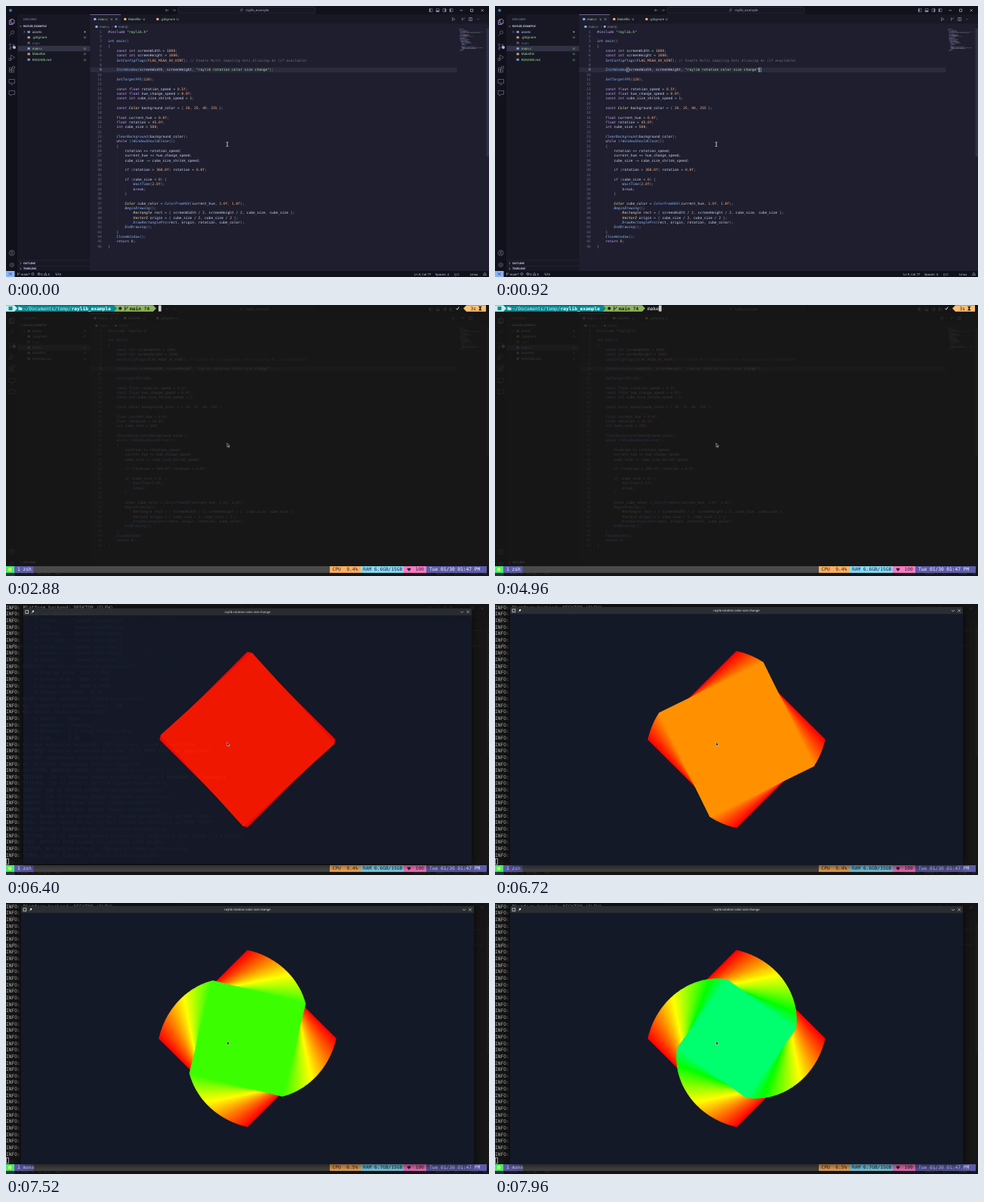
Recreate the animation shown at these times as an HTML page. Size 640 by 360 pixels, loop 8000 ms.

```html
<!DOCTYPE html>
<html lang="en">
<head>
<meta charset="utf-8">
<title>raylib_example</title>
<style>
  html, body { margin: 0; width: 640px; height: 360px; overflow: hidden; background: #1e1e2e; }
  svg { display: block; }
  text { white-space: pre; text-rendering: geometricPrecision; font-family: "Noto Sans", "Open Sans", sans-serif; }
  .mono { font-family: "DejaVu Sans Mono", "Liberation Mono", monospace; }
  .shadow { filter: drop-shadow(0 2px 7px rgba(0, 0, 0, .75)); }
</style>
</head>
<body>
<svg id="stage" width="640" height="360" viewBox="0 0 640 360"></svg>
<script>
const LOOP = 8000, STEP = 40;
const stage = document.getElementById('stage');

function el(parent, tag, attrs = {}, content) {
  const node = document.createElementNS('http://www.w3.org/2000/svg', tag);
  for (const k in attrs) node.setAttribute(k, attrs[k]);
  if (content !== undefined) node.textContent = content;
  return parent.appendChild(node);
}
const group = (parent, attrs) => el(parent, 'g', attrs);
const box = (parent, x, y, width, height, fill, more) => el(parent, 'rect', { x, y, width, height, fill, ...more });
const dot = (parent, cx, cy, r, fill) => el(parent, 'circle', { cx, cy, r, fill });
const line = (parent, d, stroke, w = 0.6, more) =>
  el(parent, 'path', { d, stroke, fill: 'none', 'stroke-width': w, ...more });
const shape = (parent, d, fill, more) => el(parent, 'path', { d, fill, ...more });
// y is the middle of the text line
const label = (parent, x, y, str, fill, size = 4.3, more) =>
  el(parent, 'text', { x, y: y + size * 0.35, fill, 'font-size': size, ...more }, str);
const show = (node, on) => node.setAttribute('display', on ? 'inline' : 'none');

/* ---------- editor ---------- */
const C = { crust: '#11111b', mantle: '#181825', base: '#1e1e2e', text: '#cdd6f4', dim: '#6c7086',
  green: '#a6e3a1', mauve: '#cba6f7', blue: '#89b4fa', yellow: '#f9e2af', peach: '#fab387',
  teal: '#94e2d5', punct: '#9399b2', line: '#313244' };

const CODE = `#include "raylib.h"

int main()
{
    const int screenWidth = 1800;
    const int screenHeight = 1000;
    SetConfigFlags(FLAG_MSAA_4X_HINT); // Enable Multi Sampling Anti Aliasing 4x (if available)

    InitWindow(screenWidth, screenHeight, "raylib rotation color size change");

    SetTargetFPS(120);

    const float rotation_speed = 0.5f;
    const float hue_change_speed = 0.9f;
    const int cube_size_shrink_speed = 1;

    const Color background_color = { 20, 25, 40, 255 };

    float current_hue = 0.0f;
    float rotation = 45.0f;
    int cube_size = 500;

    ClearBackground(background_color);
    while (!WindowShouldClose())
    {
        rotation += rotation_speed;
        current_hue += hue_change_speed;
        cube_size -= cube_size_shrink_speed;

        if (rotation > 360.0f) rotation = 0.0f;

        if (cube_size < 0) {
            WaitTime(2.0f);
            break;
        }

        Color cube_color = ColorFromHSV(current_hue, 1.0f, 1.0f);
        BeginDrawing();
            Rectangle rect = { screenWidth / 2, screenHeight / 2, cube_size, cube_size };
            Vector2 origin = { cube_size / 2, cube_size / 2 };
            DrawRectanglePro(rect, origin, rotation, cube_color);
        EndDrawing();
    }
    CloseWindow();
    return 0;
}`.split('\n');

const TOKEN = /(\/\/.*)|("[^"]*")|(#include|\b(?:const|int|float|while|if|break|return)\b)|(\b(?:Color|Rectangle|Vector2)\b)|([A-Za-z]\w*(?=\())|(\bFLAG\w+|\b\d[\d.]*f?\b)|([-+*\/=<>!]+)|([{}(),;]+)|\w+|\s+|./g;
const TOKEN_FILL = [C.dim, C.green, C.mauve, C.yellow, C.blue, C.peach, C.teal, C.punct];
const ITALIC = [0, 3, 4];
const CODE_X = 135.3, CHAR = 2.787, CODE_SIZE = CHAR / 0.602, ROW = 6.333;
const rowY = n => 34.2 + (n - 1) * ROW;

const ide = group(stage);
box(ide, 0, 0, 640, 360, C.base);

function drawChrome() {
  box(ide, 0, 0, 640, 11.5, C.crust);
  box(ide, 0, 11.5, 15.5, 341, C.crust);
  box(ide, 15.5, 11.5, 96, 341, C.mantle);
  box(ide, 111.5, 11.5, 528.5, 12, C.mantle);
  box(ide, 0, 352, 640, 8, C.crust);

  // title bar
  dot(ide, 6, 5.7, 2, '#2a7fc0');
  box(ide, 228, 1.5, 182, 8.5, C.mantle, { rx: 1.5, stroke: C.line, 'stroke-width': 0.5 });
  label(ide, 333, 5.7, 'raylib_example', '#a6adc8', 4.4, { 'text-anchor': 'middle' });
  line(ide, 'M311.2 5a1.2 1.2 0 1 0 2.4 0a1.2 1.2 0 1 0-2.4 0M311.6 6l-1.2 1.5', C.punct, 0.5);
  line(ide, 'M215.5 5.7h-4m1.6-1.6l-1.6 1.6l1.6 1.6', C.punct);
  line(ide, 'M220.5 5.7h4m-1.6-1.6l1.6 1.6l-1.6 1.6', C.dim);
  [563, 572, 581, 590].forEach((x, i) => {
    line(ide, `M${x - 2} 3.7h4v4h-4z`, C.punct, 0.5);
    box(ide, i == 2 ? x + 0.5 : x - 2, i == 1 ? 5.9 : 3.7, i == 1 ? 4 : 1.5, i == 1 ? 1.8 : 4, C.punct);
  });
  line(ide, 'M601.5 5.8h3.5M615.5 4.2h3.2v3.2h-3.2zM629.6 4.2l3.2 3.2m0-3.2l-3.2 3.2', C.text, 0.6);

  // activity bar
  line(ide, 'M6.5 17.5h3l1.5 1.5v4h-4.5zM6.5 19h-2v5.5h4.5V23', C.mauve, 0.7);
  [ 'M6.6 35a2 2 0 1 0 4 0a2 2 0 1 0-4 0M7.2 36.5l-2.7 3',
    'M5.5 50a1 1 0 1 0 .1 0M5.5 56a1 1 0 1 0 .1 0M10 51a1 1 0 1 0 .1 0M5.5 52v4M10 53q0 2-4 2.3',
    'M6.5 65l5 3.2l-5 3.2zM4 69.5h2.5v3h-2.5z',
    'M4.5 82h3v3h-3zM4.5 85h3v3h-3zM7.5 85h3v3h-3zM8.7 80.3h2.8v2.8h-2.8z',
    'M4 97.5h7.5v5h-7.5zM6 104.5h3.5',
    'M4 112.5h7.5v5h-3.5l-2 2v-2h-2z',
    'M4.2 328a3.5 3.5 0 1 0 7 0a3.5 3.5 0 1 0-7 0M6.5 327a1.2 1.2 0 1 0 2.4 0a1.2 1.2 0 1 0-2.4 0M5.5 330.3q2.2-2.4 4.4 0',
    'M5 344a2.7 2.7 0 1 0 5.4 0a2.7 2.7 0 1 0-5.4 0M7 344a.8.8 0 1 0 1.6 0a.8.8 0 1 0-1.6 0'
  ].forEach(d => line(ide, d, C.dim, 0.7));
  dot(ide, 11, 55, 2, C.mauve);

  // explorer
  label(ide, 23, 17.5, 'EXPLORER', C.punct, 3.6);
  label(ide, 23, 27, 'RAYLIB_EXAMPLE', C.text, 3.6, { 'font-weight': 700 });
  line(ide, 'M18.2 26.3l1.3 1.4l1.3-1.4', C.text, 0.5);
  box(ide, 15.5, 52.8, 96, 7.4, C.line);
  [['assets', C.text, C.blue], ['.gitignore', C.green, C.peach], ['main', C.dim, C.dim],
   ['main.c', C.green, C.blue], ['Makefile', C.green, C.peach], ['README.md', C.green, C.blue]
  ].forEach(([name, fill, mark], i) => {
    const y = 34.4 + i * 7.36;
    box(ide, 28.5, y - 1.5, 3.4, 3, mark, { rx: 0.5, opacity: 0.8 });
    label(ide, 34.8, y, name, fill, 4.3);
    if (i == 0) {
      line(ide, `M23.6 ${y - 1.3}l1.4 1.3l-1.4 1.3`, C.text, 0.5);
      dot(ide, 104.5, y, 0.9, C.green);
    } else if (i != 2) label(ide, 103, y, 'U', C.green, 4);
  });
  [['OUTLINE', 341.7], ['TIMELINE', 349]].forEach(([name, y]) => {
    line(ide, `M15.5 ${y - 3.7}h96`, C.line, 0.4);
    line(ide, `M18.7 ${y - 1.3}l1.4 1.3l-1.4 1.3`, C.text, 0.5);
    label(ide, 23, y, name, C.text, 3.6, { 'font-weight': 700 });
  });

  // tabs and breadcrumb
  box(ide, 111.5, 11.5, 40.5, 12, C.base);
  box(ide, 111.5, 11.5, 40.5, 0.5, C.mauve);
  [['main.c', 122, 138.5, C.blue], ['Makefile', 162, 181.5, C.peach], ['.gitignore', 205, 226, C.peach]
  ].forEach(([name, x, u, mark], i) => {
    box(ide, x - 5.6, 16, 3, 3, mark, { rx: 0.6 });
    label(ide, x, 17.5, name, C.green, 4.2);
    label(ide, u, 17.5, 'U', C.green, 3.8);
    if (i == 0) line(ide, 'M145 16.2l2.6 2.6m0-2.6l-2.6 2.6', C.text, 0.5);
  });
  box(ide, 118.5, 26, 3, 3, C.blue, { rx: 0.6 });
  label(ide, 124, 27.3, 'main.c', C.punct, 4.2);
  line(ide, 'M140.4 26.2l1.2 1.2l-1.2 1.2', C.dim, 0.5);
  box(ide, 144, 26, 2.8, 2.8, C.blue, { rx: 0.8 });
  label(ide, 149, 27.3, 'main()', C.punct, 4.2);
  line(ide, 'M591.5 15.5l3.4 2l-3.4 2zM604.5 15.5v4m0-2q3 0 3-2M613.5 15.5h4v4h-4zM615.5 15.5v4', C.punct, 0.6);
  label(ide, 624, 17, '···', C.text, 4.3);

  // status bar
  box(ide, 0, 352, 11.5, 8, C.blue);
  line(ide, 'M3.8 354.3l1.7 1.7l-1.7 1.7M7.7 354.3l-1.7 1.7l1.7 1.7', C.crust, 0.6);
  line(ide, 'M15.5 354.3v3.6M17.8 354.3q0 2-2.3 2.2', C.text, 0.5);
  label(ide, 19.5, 356.2, 'main*', C.text, 4.2);
  line(ide, 'M34 356a1.5 1.5 0 1 0 3 0a1.5 1.5 0 1 0-3 0', C.text, 0.5);
  line(ide, 'M42 356a1.5 1.5 0 1 0 3 0a1.5 1.5 0 1 0-3 0M42.7 355.2l1.6 1.6M50.5 357.6l1.8-3.2l1.8 3.2z', C.text, 0.5);
  label(ide, 46.3, 356.2, '0', C.text, 4.2);
  label(ide, 55.5, 356.2, '5', C.text, 4.2);
  line(ide, 'M66.5 354.5q-1.4 1.5 0 3m2.4-3q1.4 1.5 0 3m-1.2-1.5v2', C.text, 0.5);
  label(ide, 70.5, 356.2, '0', C.text, 4.2);
  [['Ln 9, Col 77', 541], ['Spaces: 4', 569], ['{} C', 594], ['Linux', 615]
  ].forEach(([s, x]) => label(ide, x, 356.2, s, C.text, 4.1));
  line(ide, 'M632.5 357.5h4l-.7-1.2v-1q-1.3-1.8-2.6 0v1z', C.text, 0.5);
}

function drawCode() {
  box(ide, 111.5, rowY(9) - ROW / 2, 486, ROW, '#2a2b3c');
  box(ide, 636.5, 30, 3.5, 170, '#45475a', { opacity: 0.45 });
  line(ide, `M147 ${rowY(26) - 3}V${rowY(43) - 3}M158 ${rowY(33) - 3}v${2 * ROW}`, C.line, 0.3);
  CODE.forEach((src, i) => {
    const y = rowY(i + 1);
    label(ide, 126.8, y, i + 1, i == 8 ? C.mauve : C.dim, CODE_SIZE, { class: 'mono', 'text-anchor': 'end' });
    const row = label(ide, CODE_X, y, '', C.text, CODE_SIZE, { class: 'mono' });
    for (const m of src.matchAll(TOKEN)) {
      const kind = m.slice(1).findIndex(Boolean);
      const fill = TOKEN_FILL[kind] || C.text;
      el(row, 'tspan', { fill, 'font-style': ITALIC.includes(kind) ? 'italic' : 'normal' }, m[0]);
      if (m[0].trim()) box(ide, 600 + m.index * 0.36, 30 + i * 0.66, m[0].length * 0.36, 0.45, fill, { opacity: 0.5 });
    }
  });
}
drawChrome();
drawCode();

const brackets = group(ide);
[14, 77].forEach(col => box(brackets, CODE_X + col * CHAR, rowY(9) - 2.9, CHAR, 5.8, '#89b4fa22',
  { stroke: C.punct, 'stroke-width': 0.5 }));
box(brackets, CODE_X + 77 * CHAR - 0.3, rowY(9) - 2.9, 0.6, 5.8, '#f5e0dc');

const beam = line(stage, 'M291.8 181h1l.4.4l.4-.4h1M293.2 181.4v4.6M291.8 186.4h1l.4-.4l.4.4h1', '#fff', 0.7);

/* ---------- terminal ---------- */
const CELL = 3.743, CELL_H = 8.66, TERM_SIZE = CELL / 0.602;
const D = { bar: '#4b4b4b', dark: '#282a36', purple: '#5d5cae', green: '#3df07a', yellow: '#e6f03c',
  orange: '#ffb05c', cyan: '#84dcf8', pink: '#ff79c6', white: '#f8f8f2', ink: '#17211a',
  os: '#c4f1ee', path: '#078a92', git: '#8fb45c', time: '#ffc070' };
const cells = (parent, x, row, str, fill, more) =>
  label(parent, x, 4.5 + row * CELL_H, str, fill, TERM_SIZE, { class: 'mono', ...more });

const LOG = `Platform backend: DESKTOP (GLFW)
Supported raylib modules:
    > rcore:..... loaded (mandatory)
    > rlgl:...... loaded (mandatory)
    > rshapes:... loaded (optional)
    > rtextures:. loaded (optional)
    > rtext:..... loaded (optional)
    > rmodels:... loaded (optional)
    > raudio:.... loaded (optional)
DISPLAY: Device initialized successfully
    > Display size: 1920 x 1080
    > Screen size:  1800 x 1000
    > Render size:  1800 x 1000
    > Viewport offsets: 0, 0
GLAD: OpenGL extensions loaded successfully
GL: Supported extensions count: 228
GL: OpenGL device information:
    > Vendor:   Mesa
    > Renderer: llvmpipe
    > Version:  3.3 (Core Profile) Mesa
    > GLSL:     3.30
GL: VAO extension detected, VAO functions loaded successfully
GL: NPOT textures extension detected, full NPOT textures supported
GL: DXT compressed textures supported
GL: ETC2/EAC compressed textures supported
PLATFORM: DESKTOP (GLFW): Initialized successfully
TEXTURE: [ID 1] Texture loaded successfully (1x1 | R8G8B8A8 | 1 mipmaps)
TEXTURE: [ID 1] Default texture loaded successfully
SHADER: [ID 1] Vertex shader compiled successfully
SHADER: [ID 2] Fragment shader compiled successfully
SHADER: [ID 3] Program shader loaded successfully
SHADER: [ID 3] Default shader loaded successfully
RLGL: Render batch vertex buffers loaded successfully in RAM (CPU)
RLGL: Render batch vertex buffers loaded successfully in VRAM (GPU)
RLGL: Default OpenGL state initialized successfully
TEXTURE: [ID 2] Texture loaded successfully (128x128 | GRAY_ALPHA | 1 mipmaps)
FONT: Default font loaded successfully (224 glyphs)
SYSTEM: Working Directory: ~/Documents/temp/raylib_example
TIMER: Target time per frame: 8.333 milliseconds`.split('\n');

const term = group(stage);
box(term, 0, 0, 640, 360, 'rgba(22,23,20,.82)');

const prompt = group(term);
shape(prompt, 'M143 .2h52l4 4.3l-4 4.3h-52z', D.git);
shape(prompt, 'M11 .2h132l4 4.3l-4 4.3h-132z', D.path);
shape(prompt, 'M0 .2h11l4 4.3l-4 4.3h-11z', D.os);
box(prompt, 3.5, 2, 5, 5, D.path);
shape(prompt, 'M16.5 2.6h2l.6.8h2.4v3.4h-5z', '#e4e4e4');
cells(prompt, 23, 0, '~/Documents/temp/', '#e4e4e4');
cells(prompt, 23 + 17 * CELL, 0, 'raylib_example', '#fff', { 'font-weight': 700 });
dot(prompt, 151.3, 4.5, 2, D.ink);
line(prompt, 'M157.8 1.5v6M161 2v1.2q0 1.6-3.2 2.2', D.ink, 0.9);
cells(prompt, 164, 0, 'main ?4', D.ink, { 'font-weight': 700 });
line(prompt, 'M596.5 4.6l1.3 1.6l2.4-3.6', '#d8e8d0', 1);
shape(prompt, 'M636 .2h-26l-4 4.3l4 4.3h26z', D.time);
cells(prompt, 615.5, 0, '3s', '#222');
shape(prompt, 'M626 1.8h4.6l-1.8 2.7l1.8 2.7h-4.6l1.8-2.7z', '#222');

const typed = cells(term, 202, 0, '', D.white);
const build = cells(term, 0, 1, 'gcc main.c -o main -lraylib -lGL -lm -lpthread -ldl -lrt -lX11', '#c8c8c8');
const log = group(term);
LOG.forEach((s, i) => cells(log, 0, i, 'INFO: ' + s, '#b4b4b4'));
const caret = box(term, 0, 0.5, CELL, 8, '#c8c8c8');
const hollow = box(term, 0.4, 338.3, 3, 7.6, 'none', { stroke: '#d0d0d0', 'stroke-width': 0.7 });

// tmux status line
[[0, 637, D.bar], [0, 11, D.green], [11, 25.5, D.purple], [429, 41, D.orange], [470, 57, D.cyan],
 [527, 30, D.pink], [557, 80, D.purple]].forEach(([x, w, fill]) => box(term, x, 347, w, 8.8, fill));
dot(term, 5.2, 351.4, 2.4, D.yellow);
const job = cells(term, 15, 40, '', D.white);
const cpu = cells(term, 432.5, 40, '', D.dark);
const ram = cells(term, 473, 40, '', D.dark);
shape(term, 'M534 353.8l-2.3-2.6q-.4-2 1.2-2q.8 0 1.1.8q.3-.8 1.1-.8q1.6 0 1.2 2z', D.dark);
cells(term, 542.5, 40, '100', D.dark);
cells(term, 561, 40, 'Tue 01/30 01:47 PM', D.white);

/* ---------- raylib window ---------- */
const win = group(stage);
box(win, 20, 4, 600, 343, '#141928', { class: 'shadow' });
shape(win, 'M20 13.3V5.5q0-1.5 1.5-1.5h597q1.5 0 1.5 1.5v7.8z', '#2a2e32');
box(win, 22.6, 6.6, 4.6, 4.6, '#e8e8e8');
box(win, 23.3, 7.3, 3.2, 3.2, '#333');
line(win, 'M31 10.6l1.4-1.4', '#fcfcfc', 0.6);
shape(win, 'M31.6 8.3l1.8-1.6l1.2 1.2l-1.6 1.8z', '#fcfcfc');
line(win, 'M605 8l2 2l2-2M613.2 7l3.6 3.6m0-3.6l-3.6 3.6', '#e4e4e4', 0.6);
label(win, 320, 8.9, 'raylib rotation color size change', '#e8e8e8', 4.1, { 'text-anchor': 'middle' });

// each drawn rectangle stays, as the background is cleared only once
const START = 6334, MS_PER_DRAW = 10;
const trail = [];
for (let n = 0; n <= (LOOP - START) / MS_PER_DRAW; n++) {
  const size = (500 - n) / 3;
  trail.push(box(win, -size / 2, -size / 2, size, size, `hsl(${0.9 * n},100%,50%)`,
    { transform: `translate(320 180) rotate(${45 + 0.5 * n})` }));
}

const arrow = shape(stage, 'M293 183.6v5l1.2-1l.8 1.7l.8-.4l-.8-1.6h1.5z', '#111',
  { stroke: '#eee', 'stroke-width': 0.5 });

/* ---------- timeline ---------- */
const DROP = 2240, KEYS = [4640, 4720, 4800, 4880], ENTER = 6080, RUN = 6240, OPEN = 6320, REFRESH = 7000;
const easeOut = (t, from, span) => 1 - (1 - Math.min(1, Math.max(0, (t - from) / span))) ** 3;

function render(t) {
  const down = t >= DROP + STEP;
  show(brackets, t >= 840 && !down);
  show(term, down);
  show(arrow, down);
  show(beam, !down);
  term.setAttribute('transform', `translate(0 ${-360 * (1 - easeOut(t, DROP, 240))})`);

  const chars = KEYS.filter(k => t >= k).length;
  const running = t >= RUN;
  typed.textContent = 'make'.slice(0, chars);
  show(prompt, !running);
  show(typed, !running);
  show(build, t >= ENTER && !running);
  show(log, running);
  show(caret, t < OPEN);
  caret.setAttribute('x', t >= ENTER ? 0 : 202 + chars * CELL);
  caret.setAttribute('y', 0.5 + CELL_H * (running ? 39 : t >= ENTER ? 2 : 0));
  show(hollow, t >= OPEN);

  const fresh = t >= REFRESH;
  job.textContent = fresh ? '1 make' : '1 zsh';
  cpu.textContent = fresh ? 'CPU  6.5%' : 'CPU  9.4%';
  ram.textContent = fresh ? 'RAM 6.7GB/15GB' : 'RAM 6.6GB/15GB';

  show(win, t >= OPEN);
  const grow = easeOut(t, OPEN - STEP, 200);
  win.setAttribute('opacity', grow);
  win.setAttribute('transform', `translate(320 180) scale(${0.85 + 0.15 * grow}) translate(-320 -180)`);
  const drawn = (t - START) / MS_PER_DRAW;
  trail.forEach((r, n) => show(r, n <= drawn));
}

const begin = performance.now();
let last = -1;
function tick() {
  const t = Math.floor((performance.now() - begin) % LOOP / STEP) * STEP;
  if (t !== last) render(last = t);
  requestAnimationFrame(tick);
}
tick();
</script>
</body>
</html>
```
